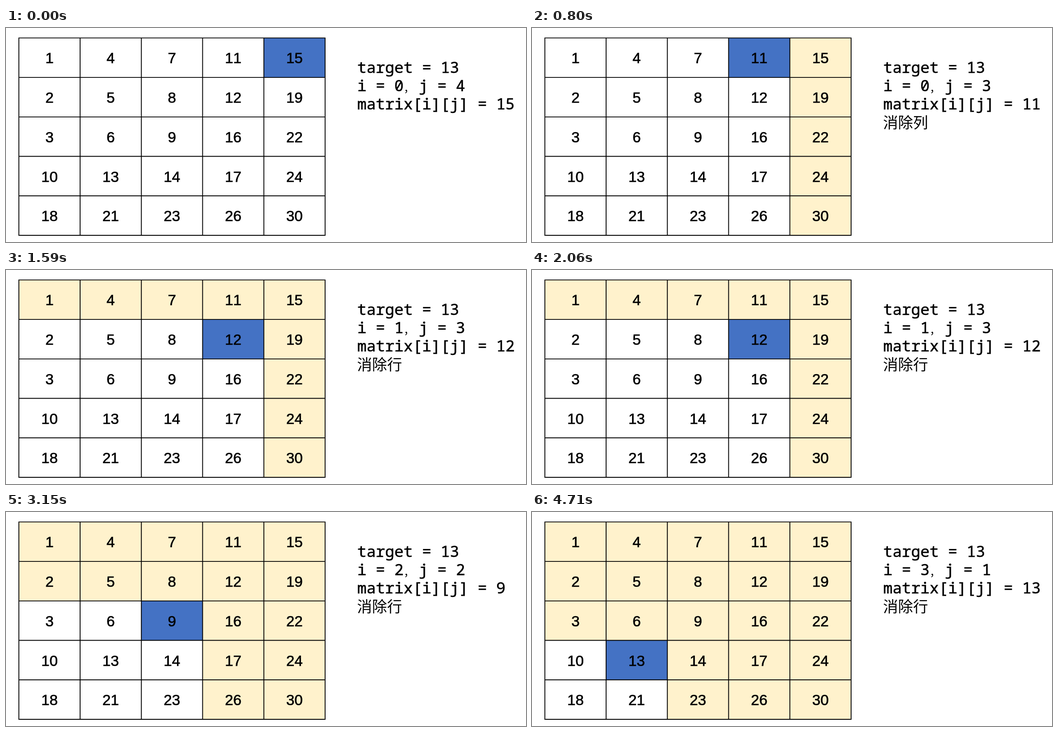
An HTML page for the animation above (5.49 s loop, 1165 by 481 pixels).

```html
<!DOCTYPE html>
<html lang="zh">
<head>
<meta charset="utf-8">
<style>
  html, body { margin: 0; width: 100%; height: 100%; overflow: hidden; background: #fff; }
  svg { display: block; width: 1165px; height: 481px; }
  .grid { stroke: #000; stroke-width: 1.9; fill: none; }
  .num { font: 33.3px "Liberation Sans", sans-serif; font-kerning: none; text-anchor: middle; stroke: #000; stroke-width: .7; }
  .code { font: 500 34.6px "Noto Sans Mono", monospace; white-space: pre; stroke: #000; stroke-width: .6; }
  .cjk { font: 33.6px "Noto Sans CJK SC", "Noto Sans CJK", sans-serif; }
  .comma { font: 300 26px "Noto Sans CJK SC", "Noto Sans CJK", sans-serif; }
</style>
</head>
<body>
<svg id="stage" viewBox="0 0 1165 481"></svg>
<script>
const MATRIX = [
  [1, 4, 7, 11, 15],
  [2, 5, 8, 12, 19],
  [3, 6, 9, 16, 22],
  [10, 13, 14, 17, 24],
  [18, 21, 23, 26, 30]
];
const TARGET = 13, LOOP = 5490;
const STARTS = [0, 800, 1590, 2370, 3150, 3930, 4710];
const LEFT = 28.8, TOP = 22.4, CELL_W = 137.22, CELL_H = 88.72, SIZE = 5;
const ACTIVE = '#4472c4', REMOVED = '#fff2cc', OPEN = '#fff';

const stage = document.getElementById('stage');

function add(tag, attrs, text = '') {
  const node = document.createElementNS('http://www.w3.org/2000/svg', tag);
  for (const key in attrs) node.setAttribute(key, attrs[key]);
  node.textContent = text;
  return stage.appendChild(node);
}
const label = (cls, x, y, text = '') => add('text', { class: cls, x, y }, text);
const colX = j => LEFT + j * CELL_W;
const rowY = i => TOP + i * CELL_H;

const cells = MATRIX.map((row, i) => row.map((_, j) =>
  add('rect', { x: colX(j), y: rowY(i), width: CELL_W, height: CELL_H })));

let lines = '';
for (let k = 0; k <= SIZE; k++) {
  lines += `M${colX(k)} ${rowY(0) - 0.95}V${rowY(SIZE) + 0.95}M${colX(0) - 0.95} ${rowY(k)}H${colX(SIZE) + 0.95}`;
}
add('path', { class: 'grid', d: lines });

MATRIX.forEach((row, i) => row.forEach((value, j) =>
  label('num', colX(j + 0.5), rowY(i + 0.5) + 12.6, value)));

label('code', 787, 100.8, `target = ${TARGET}`);
const rowText = label('code', 787, 141.8);
label('comma', 893, 141.8, ',');
const colText = label('code', 925, 141.8);
const valueText = label('code', 787, 182.5);
const note = label('cjk', 786.5, 225);

// Start top right, then drop a column and a row in turn.
const steps = STARTS.map((_, k) => ({
  i: Math.floor(k / 2),
  j: SIZE - 1 - Math.ceil(k / 2),
  note: k === 0 ? '' : k % 2 ? '消除列' : '消除行'
}));

function show(step) {
  cells.forEach((row, i) => row.forEach((cell, j) => {
    const active = i === step.i && j === step.j;
    const removed = i < step.i || j > step.j;
    cell.setAttribute('fill', active ? ACTIVE : removed ? REMOVED : OPEN);
  }));
  rowText.textContent = `i = ${step.i}`;
  colText.textContent = `j = ${step.j}`;
  valueText.textContent = `matrix[i][j] = ${MATRIX[step.i][step.j]}`;
  note.textContent = step.note;
}

const origin = performance.now();
let current = -1;
function tick() {
  const time = (performance.now() - origin) % LOOP;
  const index = STARTS.filter(start => start <= time).length - 1;
  if (index !== current) show(steps[current = index]);
  requestAnimationFrame(tick);
}
tick();
</script>
</body>
</html>
```
